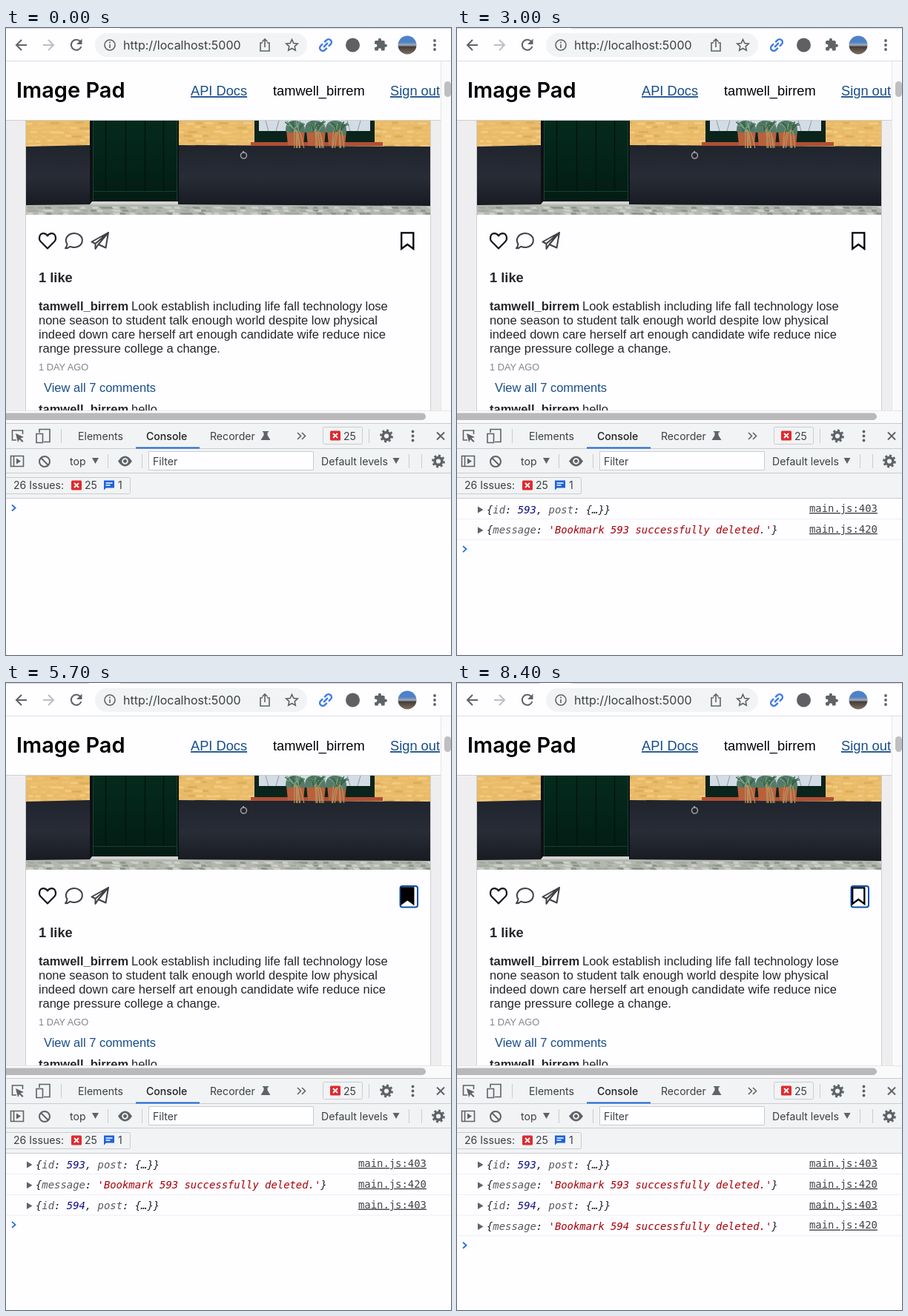
Recreate the animation shown at these times as an HTML page. Size 600 px wide and 846 px high, loop 8.5 s.

```html
<!DOCTYPE html>
<html lang="en">
<head>
<meta charset="utf-8">
<title>Bookmark demo</title>
<style>
html, body { margin: 0; width: 100%; height: 100%; overflow: hidden; background: #fefdff; }
svg { display: block; width: 100vw; height: 100vh; }
text { white-space: pre; }
.page { font: 16.5px "Liberation Sans", Arial, sans-serif; fill: #262628; }
.bold { font-weight: bold; }
.title { font: 600 29px Inter, sans-serif; fill: #000; }
.nav { font-size: 18.25px; fill: #000; }
.link { fill: #184e8a; }
.nav.link { text-decoration: underline; }
.tools { font: 14.1px Inter, sans-serif; fill: #3c4043; }
.mono { font: 13.88px "DejaVu Sans Mono", monospace; fill: #202124; }
.value { font-style: italic; }
.key { fill: #55585c; }
.number { fill: #0c0c86; }
.string { fill: #a80008; }
.source { fill: #404347; text-decoration: underline; }
.icon { fill: none; stroke: #5f6368; stroke-width: 2; }
.thin { stroke-width: 1.6; }
.solid { fill: #5f6368; }
.post { fill: none; stroke: #18181a; stroke-width: 2.2; stroke-linejoin: round; }
.soft { stroke: #414145; stroke-width: 2; }
.rule { stroke: #cacdd1; }
</style>
</head>
<body>
<svg viewBox="0 0 600 846" preserveAspectRatio="none">
  <defs>
    <linearGradient id="sky" x2="0" y2="1">
      <stop offset=".35" stop-color="#4d82c9"/><stop offset=".5" stop-color="#a5aab0"/>
      <stop offset=".6" stop-color="#453e3b"/><stop offset="1" stop-color="#80705f"/>
    </linearGradient>
    <linearGradient id="base" x2="0" y2="1">
      <stop stop-color="#20242d"/><stop offset=".5" stop-color="#282c36"/><stop offset="1" stop-color="#16191f"/>
    </linearGradient>
    <linearGradient id="door" x2="0" y2="1">
      <stop stop-color="#052b1d"/><stop offset="1" stop-color="#031c14"/>
    </linearGradient>
    <clipPath id="photoClip"><path d="M27 125h545v127H27z"/></clipPath>
    <clipPath id="pageClip"><path d="M0 45h586v471H0z"/></clipPath>
    <g id="gear" fill="none" stroke="#5f6368">
      <circle r="7.4" stroke-width="3" pathLength="16" stroke-dasharray="1"/>
      <circle r="4.9" stroke-width="3.6"/>
    </g>
    <g id="kebab" class="solid"><circle cy="-6" r="1.9"/><circle r="1.9"/><circle cy="6" r="1.9"/></g>
    <g id="error"><rect width="14" height="13" rx="1.5" fill="#df2a2f"/><path d="M4 3.5l6 6m0-6l-6 6" stroke="#fff" stroke-width="1.8"/></g>
  </defs>

  <path fill="#fefdff" d="M0 0h600v846H0z"/>

  <!-- Browser toolbar -->
  <path d="M0 .5h112M154 .5h446" stroke="#d5d8dc"/>
  <rect x="120" y="7" width="286" height="32" rx="16" fill="#f1f3f4"/>
  <path class="icon" d="M28 23H14m7-7-7 7 7 7"/>
  <path class="icon" d="M50 23h14m-7-7 7 7-7 7" style="stroke:#bcc0c4"/>
  <path class="icon" d="M100 18A7 7 0 1 0 101.5 25"/>
  <path class="solid" d="M102.500 14.500v7.500h-7.500z"/>
  <circle class="icon thin" cx="140" cy="23" r="7"/>
  <path class="icon thin" d="M140 22v5m0-8.500v2"/>
  <text x="158" y="29" class="tools" style="font-size:16px">http://localhost:5000</text>
  <path class="icon thin" d="M346 20h-3v11h12V20h-3m-3 6V15m-3.500 3.500L349 15l3.500 3.500"/>
  <path class="icon thin" d="M385.500 15.500l2.300 5 5.500.6-4.100 3.700 1.100 5.400-4.800-2.700-4.800 2.700 1.100-5.400-4.100-3.700 5.500-.6z"/>
  <path transform="translate(431 23) rotate(-45)" fill="none" stroke="#3d7be5" stroke-width="2.400" d="M-1.500-4h-4a4 4 0 0 0 0 8h4M1.500-4h4a4 4 0 0 1 0 8h-4M-4 0h8"/>
  <circle cx="467.500" cy="23" r="9.500" fill="#606064"/>
  <path class="solid" transform="translate(495.500 13) scale(.8)" d="M20.500 11H19V7c0-1.100-.9-2-2-2h-4V3.500a2.500 2.500 0 0 0-5 0V5H4c-1.100 0-2 .9-2 2v3.800h1.500a2.700 2.700 0 0 1 0 5.400H2V20c0 1.100.9 2 2 2h3.800v-1.500a2.700 2.700 0 0 1 5.400 0V22H17c1.100 0 2-.9 2-2v-4h1.500a2.500 2.500 0 0 0 0-5z"/>
  <circle cx="541" cy="23" r="12.500" fill="url(#sky)"/>
  <use href="#kebab" x="578" y="23"/>
  <path d="M0 44.500h600" stroke="#dcdee0"/>

  <!-- Web page -->
  <g class="page" clip-path="url(#pageClip)">
    <path fill="#eeeef0" d="M0 125h586v391H0z"/>
    <path fill="#fefdff" stroke="#cfcfd1" d="M26.500 120h546v400h-546z"/>
    <path d="M0 124.500h586" stroke="#cfcfd1"/>
    <path fill="#fefdff" d="M0 45h586v79H0z"/>
    <text class="title" x="14" y="94">Image Pad</text>
    <text class="nav link" x="249" y="91">API Docs</text>
    <text class="nav" x="360" y="91">tamwell_birrem</text>
    <text class="nav link" x="518" y="91">Sign out</text>

    <g clip-path="url(#photoClip)">
      <path fill="#e9bb68" d="M27 125h545v40H27z"/>
      <g id="bricks"></g>
      <path fill="url(#base)" d="M27 160l86-2h120l339 2v84H27z"/>
      <path fill="#0d1114" d="M113 125h120v112H113z"/>
      <path fill="url(#door)" d="M117 125h114v108H117z"/>
      <path stroke="#02150d" stroke-width="1.500" d="M134.500 125v95m27-95v95m26-95v95m25-95v95"/>
      <path stroke="#14422f" d="M117.500 125v108m113-108v108M117 220.500h114"/>
      <path fill="#0a241c" d="M335 125h162v29H335z"/>
      <path fill="#d3dce4" d="M341 125h150v14H341z"/>
      <path stroke="#8998a1" d="M350 125l4 14m14-14-4 14m96-14 4 14m14-14-4 14"/>
      <path fill="#b04f35" d="M330 154h178v5H330z"/>
      <path fill="#b9603d" d="M378 138h25l-2 20h-21zm27 0h26l-2 21h-22zm28 0h26l-2 20h-22z"/>
      <path fill="#547b68" d="M377 138q0-14 13-13t13 13q0-14 14-13t14 13q0-14 14-13t14 13-13 3H390q-13 1-13-3z"/>
      <g id="plants" fill="none" stroke-width="1.300"></g>
      <circle cx="320.500" cy="172" r="4" fill="none" stroke="#9b9da1" stroke-width="1.600"/>
      <path stroke="#9b9da1" stroke-width="2" d="M320 166v3"/>
      <path fill="#b4b7b0" d="M27 239l90-1h115l340 2v12H27z"/>
      <path fill="#d0d4d1" d="M116 234h116v4H113z"/>
      <g id="paving"></g>
    </g>

    <path class="post" d="M56 297.500l-9.400-9.600c-3-3.300-1.800-10.700 4-10.700 2.700 0 4.200 1.400 5.400 3.100 1.200-1.700 2.700-3.100 5.400-3.100 5.800 0 7 7.400 4 10.700z"/>
    <path class="post soft" d="M82.500 291.500a11 9.500 0 1 1 4 3.300q-3 2.700-6.500 2.500 2.200-2.600 2.500-5.800z"/>
    <path class="post soft" d="M115.500 288.500L138 276l-3.500 20.500-10-4.500-4 6v-7zm5 2.500L138 276l-13.500 16"/>
    <rect id="focus" x="531.500" y="274" width="23.500" height="28.500" rx="3" fill="#fefdff" stroke="#0d4fae" stroke-width="2"/>
    <path id="bookmark" d="M533.200 276.300h16.100v21.700l-8.050-6-8.050 6z" stroke="#000" stroke-width="2.300"/>

    <text class="bold" x="44" y="343" style="font-size:18.300px">1 like</text>
    <text class="bold" x="44" y="381">tamwell_birrem</text>
    <text x="169" y="381">Look establish including life fall technology lose</text>
    <text x="44" y="400">none season to student talk enough world despite low physical</text>
    <text x="44" y="419">indeed down care herself art enough candidate wife reduce nice</text>
    <text x="44" y="438">range pressure college a change.</text>
    <text x="44" y="462" style="font-size:12.800px;fill:#85858a">1 DAY AGO</text>
    <text class="link" x="51" y="491">View all 7 comments</text>
    <text class="bold" x="44" y="520">tamwell_birrem</text>
    <text x="169" y="520">hello</text>
  </g>

  <!-- Scrollbars -->
  <path fill="#fafafa" d="M586 45h14v488h-14zM0 516h600v17H0z"/>
  <path d="M586.500 45v471M0 516.500h600" stroke="#e6e6e8"/>
  <rect x="591" y="72" width="9" height="21" rx="4.500" fill="#bfbfc1"/>
  <rect x="-6" y="519.500" width="572" height="9.500" rx="4.750" fill="#b9b9bb"/>

  <!-- Developer tools -->
  <path fill="#f1f3f4" d="M0 533h600v101H0z"/>
  <path class="rule" d="M0 533.500h600M0 567.500h600M0 600.500h600M0 634.500h600M74.500 541v19M489.500 541v19M137.500 575v19M183.500 575v19M543.500 575v19M560.500 575v19"/>
  <g class="tools">
    <path class="icon thin" d="M14 556H8.500v-13h14v5"/>
    <path class="solid" d="M13 547l11 5-4.500 1.500 4 4-1.500 1.500-4-4-2 4z"/>
    <path class="icon thin" d="M45 546v-4.500h14v17h-8M41 547.500h8.500v12H41z"/>
    <text x="97" y="556">Elements</text>
    <text x="189" y="556" style="fill:#202124;font-weight:500">Console</text>
    <path fill="#1a66d6" d="M175 565.500h86v2h-86z"/>
    <text x="275" y="556">Recorder</text>
    <path class="solid" d="M346 544h8v1.500h-1.500v4l4 6.500h-13l4-6.500v-4H346z"/>
    <path class="icon thin" d="M393 546l4.500 4.500-4.500 4.500m6-9 4.500 4.500-4.500 4.500"/>
    <rect x="427.500" y="538.500" width="53" height="23" rx="2" fill="none" class="rule"/>
    <use href="#error" x="437" y="543.500"/><text x="455" y="556">25</text>
    <use href="#gear" x="513" y="550.500"/><use href="#kebab" x="548.500" y="550.500"/>
    <path class="icon" d="M581 545.500l10 10m0-10-10 10"/>

    <path class="icon thin" d="M6.500 577.500h17v14h-17zM10.500 578v13"/>
    <path class="solid" d="M14 580.500l6 4-6 4z"/>
    <circle class="icon" cx="52" cy="585" r="7"/><path class="icon" d="M47 580l10 10"/>
    <text x="86" y="590">top</text><path class="solid" d="M116 580h9l-4.500 8z"/>
    <path class="solid" d="M151 584.500q9.500-14 19 0-9.500 14-19 0z"/>
    <circle cx="160.500" cy="584.500" r="3.400" class="solid" stroke="#f1f3f4" stroke-width="1.800"/>
    <path fill="#fefdff" class="rule" d="M192.500 571.500h222v25h-222z"/>
    <text x="198" y="590">Filter</text>
    <text x="425" y="589.500">Default levels</text><path class="solid" d="M521.500 580h9l-4.500 8z"/>
    <use href="#gear" x="583" y="584.500"/>

    <path d="M0 606.500h165.500q2 0 2 2v18q0 2-2 2H0" fill="none" class="rule"/>
    <text x="10" y="622">26 Issues:</text>
    <use href="#error" x="88" y="610.500"/><text x="106" y="622">25</text>
    <path fill="#1d62dc" d="M132 610.500h14v10h-11l-3 3z"/><path stroke="#fff" stroke-width="1.300" d="M134.500 614h9m-9 3h6"/>
    <text x="151" y="622">1</text>
  </g>

  <g id="log"></g>
  <path id="prompt" d="M8 643.500l4.500 4-4.500 4" fill="none" stroke="#2f6fde" stroke-width="1.900"/>
  <path id="cursor" d="M0 0v15.500l3.600-3.400 2.700 6.400 2.800-1.200-2.700-6.200H11z" fill="#000" stroke="#fff" stroke-width="1.200"/>
</svg>
<script>
const LOOP = 8500;
const ROW_HEIGHT = 27.8;
const FOCUS_AT = 3700;
const entries = [
  { at: 1000, id: 593, saved: true },
  { at: 2000, id: 593, saved: false },
  { at: 5500, id: 594, saved: true },
  { at: 6700, id: 594, saved: false },
];
const $ = id => document.getElementById(id);
const show = (node, on) => { node.style.display = on ? "" : "none"; };

let seed = 7;
const random = () => (seed = seed * 16807 % 2147483647) / 2147483647;
const pick = list => list[Math.floor(random() * list.length)];

function paintPhoto() {
  let bricks = "", plants = "", paving = "";
  for (let y = 126; y < 158; y += 6) {
    for (let x = 27 + random() * 8; x < 572; x += 9 + random() * 10) {
      bricks += `<rect x="${x}" y="${y + random() * 2}" width="${6 + random() * 8}" height="3" fill="${pick(["#f2ca80", "#dcae5b", "#edc172"])}"/>`;
    }
  }
  for (let i = 0; i < 75; i++) {
    const x = 390 + i % 3 * 28 + (random() - .5) * 10;
    const dx = (random() - .5) * 25;
    const hanging = i % 4 === 0;
    const tone = hanging ? "#b7915d" : pick(["#426f4b", "#7ba08a", "#35614a"]);
    plants += `<path d="M${x} 140q${dx / 2}-10 ${dx} ${hanging ? 22 : -8 - random() * 7}" stroke="${tone}"/>`;
  }
  for (let row = 0; row < 3; row++) {
    for (let x = 27; x < 572; x += 8 + random() * 10) {
      paving += `<path d="M${x} ${241 + row * 4}h${4 + random() * 8}l2 3h-8z" fill="${pick(["#cccfc9", "#8f988a", "#a5aa9f"])}"/>`;
    }
  }
  $("bricks").innerHTML = bricks;
  $("plants").innerHTML = plants;
  $("paving").innerHTML = paving;
}

function logRow({ id, saved }, index) {
  const span = (kind, text) => `<tspan class="${kind}">${text}</tspan>`;
  const value = saved
    ? `{${span("key", "id")}: ${span("number", id)}, ${span("key", "post")}: {…}}`
    : `{${span("key", "message")}: ${span("string", `'Bookmark ${id} successfully deleted.'`)}}`;
  return `<g class="mono" transform="translate(0 ${index * ROW_HEIGHT})">
    <path class="solid" d="M28 645.5l7.5 4.5-7.5 4.5z"/>
    <text class="value" x="40" y="654.5">${value}</text>
    <text class="source" x="475" y="653">main.js:${saved ? 403 : 420}</text>
    <path d="M0 662.5h600" stroke="#eeeef0"/></g>`;
}

function cursorPosition(t) {
  const ease = p => p * p * (3 - 2 * p);
  const progress = (start, end) => ease(Math.min(1, Math.max(0, (t - start) / (end - start))));
  const away = 1 - progress(300, 900) + progress(2150, 2700);
  return [543 + 58 * away, 285.5 + 40 * away];
}

function render(t) {
  const count = entries.filter(entry => t >= entry.at).length;
  const saved = count > 0 && entries[count - 1].saved;
  [...$("log").children].forEach((row, i) => show(row, i < count));
  $("prompt").setAttribute("transform", `translate(0 ${count * ROW_HEIGHT})`);
  $("bookmark").setAttribute("fill", saved ? "#000" : "#fefdff");
  show($("focus"), t >= FOCUS_AT);
  $("cursor").setAttribute("transform", `translate(${cursorPosition(t)})`);
  show($("cursor"), t > 300 && t < 2700);
}

paintPhoto();
$("log").innerHTML = entries.map(logRow).join("");
const start = performance.now();
function tick() {
  render((performance.now() - start) % LOOP);
  requestAnimationFrame(tick);
}
tick();
</script>
</body>
</html>
```
